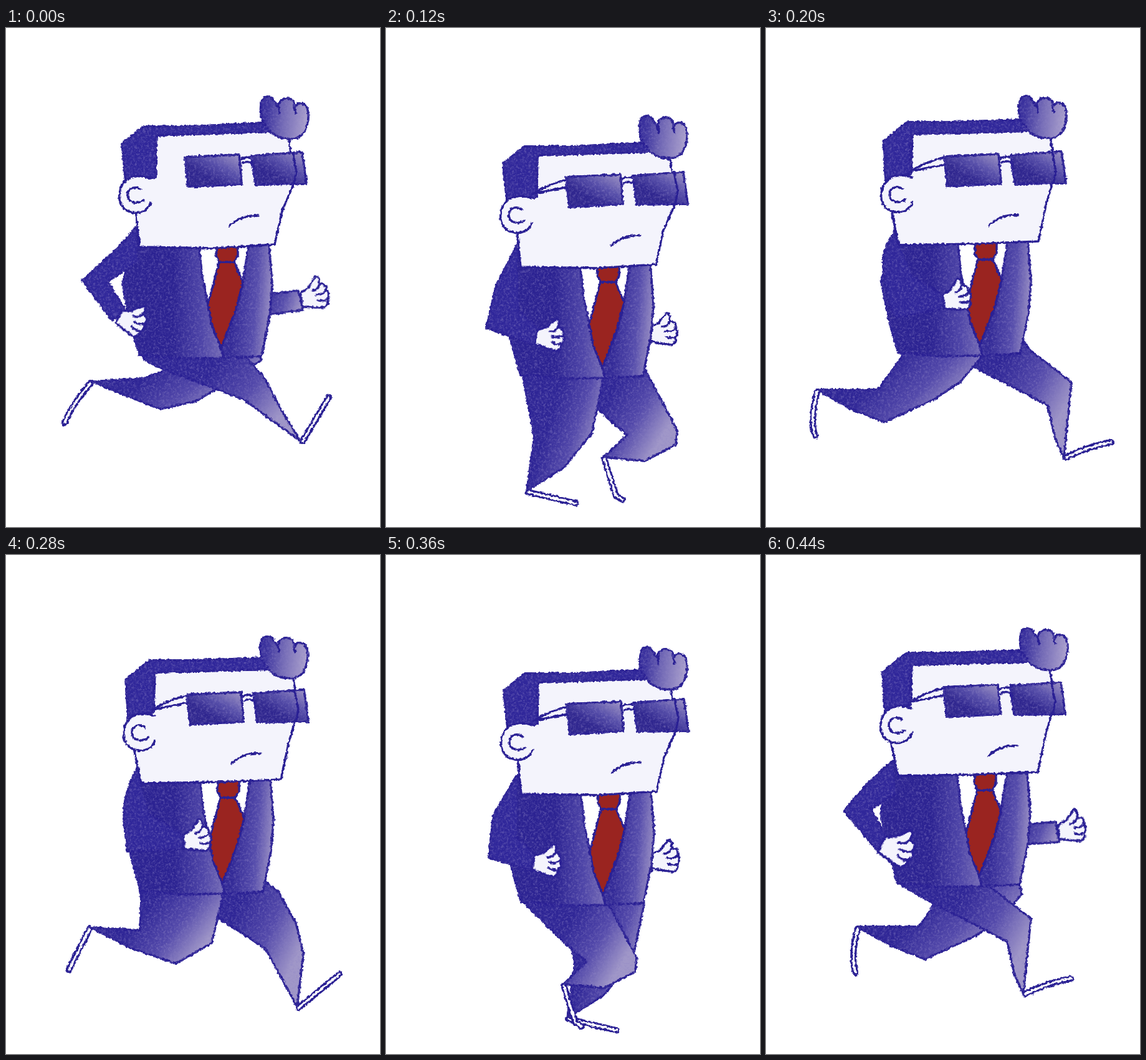
Animation of 600x800 px, one loop 0.48 s. Source, as an HTML page without scripts:

```html
<!DOCTYPE html>
<html lang="en">
<head>
<meta charset="utf-8">
<title>Running man in a suit</title>
<style>
html, body { margin: 0; height: 100%; overflow: hidden; background: #fff; }
svg { display: block; width: 100vw; height: 100vh; }

.ink { stroke: #2a2094; stroke-width: 3.4; stroke-linejoin: round; stroke-linecap: round; fill: none; }
.skin { fill: #f4f4fc; }
.white { fill: #fff; }
.red { fill: #9a2420; }
.dark { fill: #30279a; }
.coat { fill: url(#coat); }
.panel { fill: url(#panel); }
.trousers { fill: url(#trousers); }
.lens { fill: url(#lens); }
.curl { fill: url(#curl); }
.cloth { filter: url(#grain); }

.bob, .leg, .shoe, .arm, .hand, .far-arm, .far-leg, .quiff { animation: 480ms step-end infinite; }
.hair, .face, .ear, .features, .temple { animation: 240ms step-end infinite; }
.bob { animation-name: bob; }
.leg { animation-name: leg; }
.shoe { animation-name: shoe; }
.arm { animation-name: arm; }
.hand { animation-name: hand; }
.far-arm { animation-name: far-arm; }
.far-leg { animation-name: far-leg; }
.quiff { animation-name: quiff; }
.hair { animation-name: hair; }
.face { animation-name: face; }
.ear { animation-name: ear; }
.features { animation-name: features; }
.temple { animation-name: temple; }

/* The far leg runs half a cycle behind the near one. */
.far-leg .leg, .far-leg .shoe { animation-delay: -240ms; }
.shoe { stroke-width: 10; }
.shoe + .shoe { stroke: #fff; stroke-width: 3.5; }

@keyframes bob {
  0% { transform: translate(-3px, -29px); }
  8.33% { transform: translate(-1px, -15px); }
  16.66% { transform: none; }
  25% { transform: translate(-1px, 3px); }
  33.33% { transform: none; }
  41.66% { transform: translate(-5px, -33px); }
  50% { transform: translate(-3px, -29px); }
  58.33% { transform: translate(-1px, -15px); }
  66.66% { transform: translate(-1px, 0); }
  75% { transform: translate(0, 3px); }
  83.33% { transform: translate(2px, 0); }
  91.66%, to { transform: translate(-6px, -27px); }
}
@keyframes quiff {
  0% { transform: translate(4px, -3px); }
  8.33%, 16.66% { transform: none; }
  25%, 33.33% { transform: translate(0, -4px); }
  41.66%, 50% { transform: translate(3px, 0); }
  58.33% { transform: translate(1px, 3px); }
  66.66% { transform: translate(-1px, 7px); }
  75% { transform: translate(-1px, 3px); }
  83.33% { transform: translate(-2px, -1px); }
  91.66%, to { transform: translate(6px, 2px); }
}
@keyframes leg {
  0% { d: path("M212 505L222 532 255 548 335 578 382 596 472 662 440 610 415 562 386 528 340 500"); }
  8.33% { d: path("M212 520L235 556 320 610 352 632 402 724 412 640 400 590 372 540 340 515"); }
  16.66% { d: path("M212 535L217 552 300 635 318 658 340 758 365 655 347 558 345 535"); }
  25% { d: path("M212 535L220 560 238 655 226 742 285 705 330 650 349 560 345 535"); }
  33.33% { d: path("M214 535L220 558 223 655 150 702 262 690 300 645 325 605 346 556 345 535"); }
  41.66% { d: path("M212 500L218 527 180 580 82 580 135 610 190 632 270 595 312 567 345 528 340 500"); }
  50% { d: path("M205 505L212 530 195 547 155 562 72 567 182 611 240 598 270 580 345 532 340 505"); }
  58.33% { d: path("M212 520L217 552 215 602 135 597 200 630 272 655 330 622 347 550 340 520"); }
  66.66% { d: path("M212 535L222 557 250 600 283 635 218 635 270 663 340 690 354 686 357 640 347 556 345 535"); }
  75% { d: path("M212 535L220 556 290 625 322 652 285 688 350 694 400 668 402 645 355 556 345 535"); }
  83.33% { d: path("M212 535L222 560 287 592 365 640 345 718 380 672 427 624 400 590 366 554 345 535"); }
  91.66%, to { d: path("M207 505L215 528 268 558 350 600 387 620 398 670 413 705 417 660 425 583 358 531 340 505"); }
}
@keyframes shoe {
  0% { d: path("M476 662L518 592"); }
  8.33% { d: path("M404 726L470 672"); }
  16.66% { d: path("M341 758L408 716"); }
  25% { d: path("M228 744L305 762"); }
  33.33% { d: path("M152 704L172 757Q178 764 188 762"); }
  41.66% { d: path("M82 583Q70 630 79 654"); }
  50% { d: path("M71 569Q40 605 29 633"); }
  58.33% { d: path("M134 599L101 665"); }
  66.66% { d: path("M216 637L202 704"); }
  75% { d: path("M285 690L304 750 314 756"); }
  83.33% { d: path("M346 720L428 735"); }
  91.66%, to { d: path("M415 704Q450 686 489 679"); }
}
@keyframes far-leg {
  0%, 50% { transform: translate(65px, 0); }
  41.66% { transform: translate(65px, -15px); }
  91.66%, to { transform: translate(65px, 16px); }
}
@keyframes arm {
  0% { d: path("M211 349L190 374 126 434 173 497 196 484 166 436 214 403"); }
  8.33% { d: path("M211 350L185 382 131 444 185 502 204 484 172 441 214 410"); }
  16.66% { d: path("M211 355L178 405 140 455 205 503 222 485 180 445 214 415"); }
  25% { d: path("M211 345L178 410 162 478 240 505 245 478 214 450"); }
  33.33% { d: path("M212 338Q185 390 180 485L262 488 262 468 225 440"); }
  41.66% { d: path("M210 363Q190 390 193 415L200 460Q204 490 215 497L290 483 290 462 240 430"); }
  50% { d: path("M211 362Q190 390 194 425Q198 485 215 492L296 478 296 458 240 430"); }
  58.33% { d: path("M210 360Q188 400 190 440L196 490 286 486 286 464 230 430"); }
  66.66% { d: path("M209 358Q188 410 189 490L269 491 268 470 230 430"); }
  75% { d: path("M210 350L172 415 165 482 235 503 240 478 210 450"); }
  83.33% { d: path("M211 345L165 405 134 445 198 500 212 482 176 443 214 405"); }
  91.66%, to { d: path("M209 357L170 392 131 437 183 499 201 482 174 434 214 410"); }
}
@keyframes hand {
  0% { transform: translate(184px, 492px) rotate(28deg); }
  8.33% { transform: translate(196px, 494px) rotate(24deg); }
  16.66% { transform: translate(217px, 497px) rotate(22deg); }
  25% { transform: translate(242px, 492px) rotate(10deg); }
  33.33% { transform: translate(261px, 479px); }
  41.66% { transform: translate(290px, 472px) rotate(-8deg); }
  50% { transform: translate(296px, 468px) rotate(-10deg); }
  58.33% { transform: translate(286px, 475px) rotate(-5deg); }
  66.66% { transform: translate(268px, 481px); }
  75% { transform: translate(236px, 490px) rotate(10deg); }
  83.33% { transform: translate(204px, 491px) rotate(18deg) scale(1.15); }
  91.66%, to { transform: translate(191px, 491px) rotate(25deg) scale(1.2); }
}
@keyframes far-arm {
  0% { transform: translate(477px, 465px) rotate(-8deg); }
  8.33% { transform: translate(467px, 474px) rotate(-4deg); }
  16.66% { transform: translate(452px, 481px); }
  25% { transform: translate(424px, 488px); }
  33.33% { transform: translate(400px, 496px); }
  41.66%, 50% { transform: translate(360px, 480px); }
  58.33% { transform: translate(378px, 488px); }
  66.66% { transform: translate(408px, 500px); }
  75% { transform: translate(426px, 488px); }
  83.33% { transform: translate(446px, 474px); }
  91.66%, to { transform: translate(475px, 471px) rotate(-4deg); }
}
@keyframes hair {
  0%, 50% { d: path("M195 275L189 214 223 187 300 187 414 181 430 195 244 201 242 225 243 268Z"); }
  16.66%, 83.33%, to { d: path("M197 277L193 215 231 184 300 184 414 180 430 198 240 203 236 225 238 267Z"); }
}
@keyframes face {
  0%, 50% { d: path("M197 277L212 330 217 380 340 382 434 376 446 322 466 276 457 208 430 195 244 201 243 268Z"); }
  16.66%, 83.33%, to { d: path("M197 277L207 330 218 381 340 379 442 375 454 318 470 262 461 208 430 198 240 203 238 267Z"); }
}
@keyframes ear {
  0%, 50% { transform: translate(-5px, -3px); }
  16.66%, 83.33%, to { transform: none; }
}
@keyframes features {
  0%, 50% { transform: translate(-1px, -3px); }
  16.66%, 83.33%, to { transform: none; }
}
@keyframes temple {
  0% { opacity: 0; }
  16.66%, to { opacity: 1; }
}
</style>
</head>
<body>
<svg viewBox="0 0 600 800" preserveAspectRatio="none">
  <defs>
    <linearGradient id="coat">
      <stop offset=".5" stop-color="#2c2392"/>
      <stop offset=".78" stop-color="#4d44a7"/>
      <stop offset="1" stop-color="#756cb6"/>
    </linearGradient>
    <linearGradient id="panel" x1=".2" y1=".4" x2="1" y2=".55">
      <stop offset=".1" stop-color="#332a97"/>
      <stop offset=".6" stop-color="#554cab"/>
      <stop offset="1" stop-color="#9c92c5"/>
    </linearGradient>
    <linearGradient id="trousers" x2="1" y2=".5">
      <stop offset=".48" stop-color="#2f2696"/>
      <stop offset=".75" stop-color="#5349aa"/>
      <stop offset="1" stop-color="#a097c8"/>
    </linearGradient>
    <linearGradient id="lens" x1=".1" y1=".8" x2=".9" y2="0">
      <stop offset=".25" stop-color="#30278f"/>
      <stop offset=".6" stop-color="#5850aa"/>
      <stop offset="1" stop-color="#9c92c4"/>
    </linearGradient>
    <linearGradient id="curl" x2="1" y2=".1">
      <stop offset=".15" stop-color="#3a319d"/>
      <stop offset=".5" stop-color="#6f66b4"/>
      <stop offset="1" stop-color="#aaa0cd"/>
    </linearGradient>

    <filter id="rough" filterUnits="userSpaceOnUse" x="0" y="0" width="600" height="800" color-interpolation-filters="sRGB">
      <feTurbulence type="fractalNoise" baseFrequency=".22" numOctaves="2" seed="1"/>
      <feDisplacementMap in="SourceGraphic" scale="5" xChannelSelector="R" yChannelSelector="G"/>
    </filter>
    <filter id="grain" color-interpolation-filters="sRGB">
      <feTurbulence type="fractalNoise" baseFrequency=".3" numOctaves="3" seed="4"/>
      <feColorMatrix values="0 0 0 0 .56  0 0 0 0 .52  0 0 0 0 .77  1.2 0 0 0 -.54"/>
      <feComposite in2="SourceGraphic" operator="atop" result="speckle"/>
      <feMerge>
        <feMergeNode in="SourceGraphic"/>
        <feMergeNode in="speckle"/>
      </feMerge>
    </filter>

    <g id="fist" class="ink">
      <path class="skin" d="M0 -11L14 -18 27 -34Q34 -34 32 -21 43 -22 42 -10 47 -3 42 4 43 14 35 17L20 15 0 11Z"/>
      <path d="M32 -21Q28 -12 20 -12M42 -10Q34 -3 25 -5M42 4Q34 8 26 4"/>
    </g>
  </defs>

  <g filter="url(#rough)">
    <g class="bob">
      <g class="far-arm">
        <path class="ink panel cloth" d="M-90 -16H-3L0 16H-90Z"/>
        <use href="#fist"/>
      </g>
    </g>

    <g class="far-leg">
      <path class="ink shoe"/>
      <path class="ink shoe"/>
      <path class="ink leg trousers cloth"/>
    </g>
    <g>
      <path class="ink shoe"/>
      <path class="ink shoe"/>
      <path class="ink leg trousers cloth"/>
    </g>

    <g class="bob">
      <path class="ink white" d="M305 365H398L383 440 348 545 325 470Z"/>
      <path class="ink coat cloth" d="M213 350L190 440 203 505 217 553 280 559 352 558 347 538 327 472 318 430 311 365Z"/>
      <path class="ink panel cloth" d="M394 365H424L430 440 426 490 413 555 352 558 348 542 383 437Z"/>
      <path class="ink red" d="M345 404H369L383 437 372 480 348 542 333 505 327 472Z"/>
      <path class="ink red" d="M341 372H375V394L369 404H345L340 394Z"/>

      <path class="ink arm dark cloth"/>
      <g class="hand"><use href="#fist"/></g>

      <path class="ink skin face"/>
      <path class="ink hair dark cloth"/>
      <path class="ink temple" d="M236 263Q262 247 292 240M240 262L292 252"/>
      <g class="ink ear">
        <path class="skin" d="M240 312C236 326 222 330 212 328 196 326 188 312 190 298 192 280 204 270 216 270 226 268 234 271 239 273"/>
        <path d="M224 291C212 283 202 292 203 300 204 312 216 316 229 308"/>
      </g>
      <g class="ink features">
        <path d="M380 243Q390 236 398 241M383 249Q391 244 399 249"/>
        <path class="lens cloth" d="M291 239L378 235 382 282 296 287Z"/>
        <path class="lens cloth" d="M398 237L479 231 486 282 404 283Z"/>
        <path d="M464 232L470 262 466 282"/>
        <path d="M363 349Q383 331 409 333"/>
      </g>
      <g class="quiff">
        <path class="ink curl cloth" d="M411 182C404 160 408 142 420 142 428 142 430 152 437 160 434 148 448 141 457 147 462 150 462 155 462 162 464 150 476 150 482 160 488 180 480 206 462 209 440 212 424 202 418 190Z"/>
        <path class="ink" d="M437 160L438 168M462 162L464 168"/>
      </g>
    </g>
  </g>
</svg>
</body>
</html>
```
